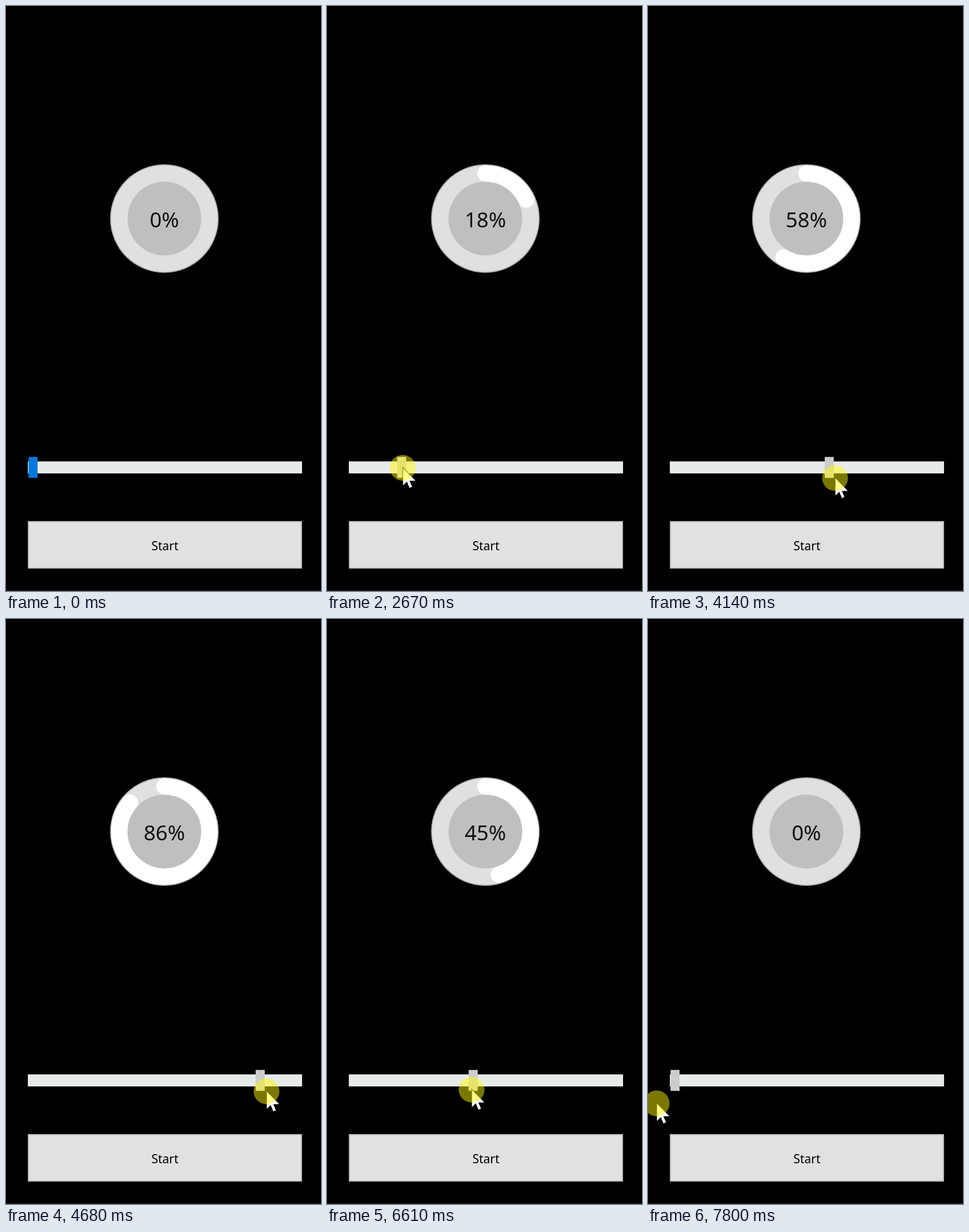
An HTML page with a canvas that plays this animation: 549x1020 px, repeating every 8 s.

```html
<!DOCTYPE html>
<html lang="en">
<head>
<meta charset="utf-8">
<title>Progress ring</title>
<style>
  html, body { margin: 0; width: 100%; height: 100%; overflow: hidden; background: #000; }
  canvas { display: block; }
</style>
</head>
<body>
<canvas id="stage" width="549" height="1020"></canvas>
<script>
const ctx = document.getElementById('stage').getContext('2d');
const LOOP = 8000, FPS = 15;
const PRESS = 30;   // tick at which the thumb is grabbed
const LAG = 0.45;   // ticks by which the thumb trails the pointer
const MIN_X = 47.25, MAX_X = 506.75;
const CX = 276, CY = 370.6;

// Hand strokes: the pointer eases to (x, y) between two ticks and rests until the next
const entry = { x: 570, y: 757 };
const strokes = [
  { from: 7, to: 16, x: 68, y: 802 },
  { from: 18, to: 21, x: 36, y: 803 },
  { from: 24, to: 27, x: 44, y: 801 },
  { from: 29, to: 42, x: 139, y: 806 },
  { from: 42, to: 45, x: 169, y: 812 },
  { from: 47, to: 49, x: 222, y: 814 },
  { from: 51, to: 54, x: 227, y: 823 },
  { from: 56, to: 68, x: 427, y: 824 },
  { from: 69, to: 70, x: 455, y: 824 },
  { from: 70, to: 82, x: 538, y: 824 },
  { from: 89, to: 99, x: 253, y: 821 },
  { from: 99, to: 111, x: 16, y: 845 },
];

const clamp = (v, lo, hi) => Math.min(hi, Math.max(lo, v));
const ease = u => u * u * (3 - 2 * u);

function pointerAt(tick) {
  let { x, y } = entry;
  for (const s of strokes) {
    const u = ease(clamp((tick - s.from) / (s.to - s.from), 0, 1));
    x += (s.x - x) * u;
    y += (s.y - y) * u;
  }
  return { x, y };
}

function disc(x, y, r, fill) {
  ctx.beginPath();
  ctx.arc(x, y, r, 0, Math.PI * 2);
  ctx.fillStyle = fill;
  ctx.fill();
}

function box(x, y, w, h, fill, edge = fill, line = 0) {
  ctx.fillStyle = edge;
  ctx.fillRect(x, y, w, h);
  ctx.fillStyle = fill;
  ctx.fillRect(x + line, y + line, w - 2 * line, h - 2 * line);
}

function label(text, x, y, size, fill) {
  ctx.font = `${size}px "Noto Sans", "Open Sans", sans-serif`;
  ctx.textAlign = 'center';
  ctx.fillStyle = fill;
  ctx.fillText(text, x, y);
}

function ring(value) {
  disc(CX, CY, 94.6, '#ababab');
  disc(CX, CY, 92.9, '#e0e0e0');
  disc(CX, CY, 64.3, '#bfbfbf');
  if (value > 0) {
    ctx.beginPath();
    ctx.arc(CX, CY, 78.6, -Math.PI / 2, (value * 2 - 0.5) * Math.PI);
    ctx.lineWidth = 28.6;
    ctx.lineCap = 'round';
    ctx.strokeStyle = '#fff';
    ctx.stroke();
  }
  label(Math.floor(value * 100) + '%', CX, 386, 36.5, '#111');
}

const arrow = new Path2D('M0 0V30L6.8 23.5L11.3 34.5L15.8 32.6L11.2 22H21.5Z');

function cursor(x, y) {
  ctx.save();
  ctx.translate(x, y);
  ctx.lineWidth = 2;
  ctx.lineCap = 'butt';
  ctx.strokeStyle = '#000';
  ctx.stroke(arrow);
  ctx.fillStyle = '#fff';
  ctx.fill(arrow);
  ctx.restore();
}

function draw() {
  const tick = Math.floor(performance.now() % LOOP * FPS / 1000 + 0.1);
  const { x, y } = pointerAt(tick);
  const pressed = tick >= PRESS;
  const thumb = pressed ? clamp(pointerAt(tick - LAG).x, MIN_X, MAX_X) : MIN_X;
  const hovered = Math.abs(x - thumb) < 8;

  box(0, 0, 549, 1020, '#000');
  box(0, 1019, 549, 1, '#303030');
  ring((thumb - MIN_X) / (MAX_X - MIN_X));
  box(38, 794, 478, 21, '#e7eaea', '#dcdfdf', 1);
  box(thumb - 7.75, 786.5, 15.5, 36, pressed ? '#ccc' : hovered ? '#171717' : '#0078de');
  box(38, 898, 478, 83, '#e1e1e1', '#adadad', 1.7);
  label('Start', 277, 949, 21, '#000');
  cursor(x - 0.4, y);
  if (pressed) disc(x - 1, y - 0.5, 22.5, 'rgba(255, 250, 0, 0.48)');
  requestAnimationFrame(draw);
}
draw();
</script>
</body>
</html>
```
